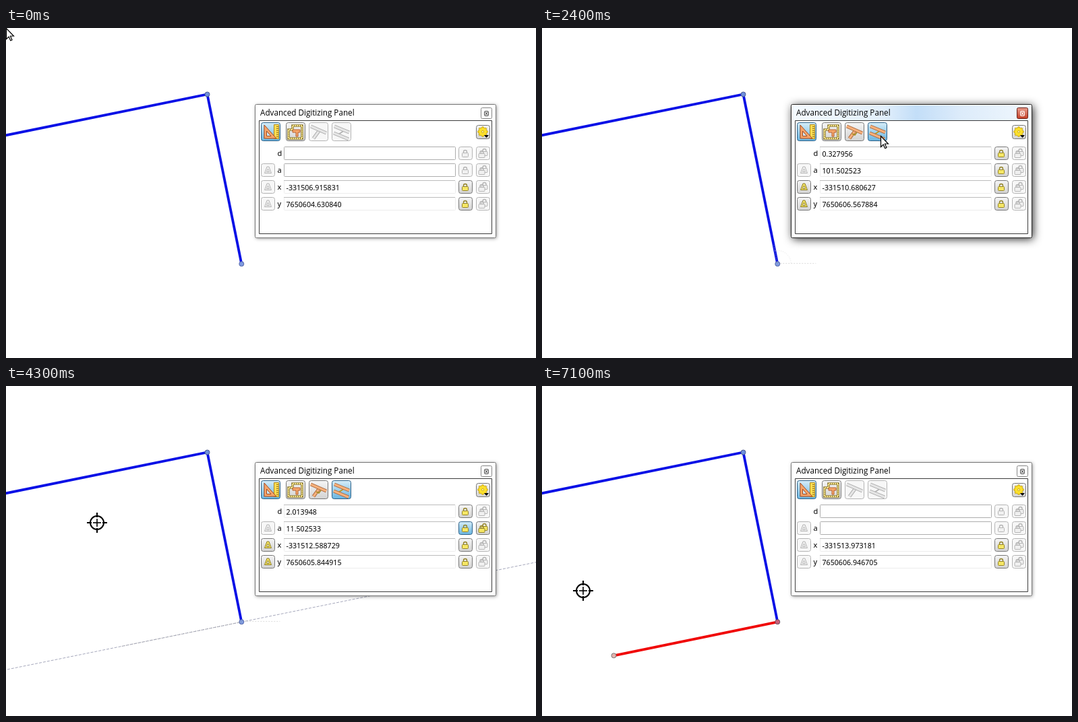
An HTML page with a canvas that plays this animation: 786x490 px, repeating every 7200 ms.

```html
<!DOCTYPE html>
<html lang="en">
<head>
<meta charset="utf-8">
<title>Advanced Digitizing Panel</title>
<style>
html, body { margin: 0; width: 100%; height: 100%; overflow: hidden; background: #fff; }
canvas { display: block; }
</style>
</head>
<body>
<canvas id="stage" width="786" height="490"></canvas>
<script>
const ctx = document.getElementById('stage').getContext('2d');
const LOOP = 7200, STEP = 100, UNIT = 0.011;
const BLUE = '#0810e6', RED = '#f00505';
const ORIGIN = { x: -331510.6152289, y: 7650606.2465147 };
const START = [0, 0], END = [-2.671, -0.55];
const CORNER = [298.5, 98.5];
const ARROW = 0, CROSS = 1;

// time, then map offset from the first digitized point
const pointKeys = [
  [0, 3.699398, -1.615675], [100, -0.752, 0.953], [600, -0.152, 0.314],
  [700, 0, 0], [1000, 0, 0], [1300, -0.065398, 0.321369], [2700, -0.065398, 0.321369],
  [2800, -0.339, 1.6658], [2900, -0.668, 1.7021], [3100, -1.2725762, 1.7867803],
  [3400, -1.4516, 1.9027], [3600, -1.8062, 2.2618], [3700, -1.97, 2.4818],
  [3900, -2.220264, 2.43097], [4100, -2.220264, 2.43097], [4200, -1.657, -0.3372],
  [4400, -2.29, -0.466], [4700, -2.27, -0.4619], [4900, -1.993668, -0.405709],
  [5300, ...END], [5500, ...END], [5800, -2.8537, 0.4519],
  [6000, -2.962828, 0.722141], [6500, -3.357952, 0.70019]
];
// time, stage position, pointer kind
const cursorKeys = [
  [0, 0, 0, ARROW], [100, 296, 281, CROSS], [600, 350, 339, CROSS], [800, 366, 369, CROSS],
  [1000, 366, 369, CROSS], [1300, 362, 338, CROSS], [1400, 386, 290, ARROW],
  [1500, 409, 262, ARROW], [2200, 494, 157, ARROW], [2500, 506, 161, ARROW],
  [2600, 494, 165, ARROW], [2700, 428, 174, ARROW], [2800, 337, 202, CROSS],
  [3100, 248, 205, CROSS], [3400, 233, 195, CROSS], [3900, 165, 148, CROSS],
  [4100, 165, 148, CROSS], [4400, 120, 230, CROSS], [4700, 135, 300, CROSS],
  [4900, 159, 307, CROSS], [5300, 118, 402, CROSS], [5500, 118, 402, CROSS],
  [5700, 108, 346, CROSS], [5800, 90, 309, ARROW], [6000, 80, 285, ARROW],
  [6100, 94, 302, CROSS], [6500, 61, 304, CROSS]
];

const within = (t, a, b) => t >= a && t < b;
const toStage = ([x, y]) => [349.3 + x / UNIT, 350.3 - y / UNIT];

function sample(keys, t) {
  let i = keys.length - 1;
  while (keys[i][0] > t) i--;
  const a = keys[i], b = keys[i + 1] || a;
  const k = b === a ? 0 : (t - a[0]) / (b[0] - a[0]);
  return [a[1] + (b[1] - a[1]) * k, a[2] + (b[2] - a[2]) * k, a[3]];
}

function line(points, color, width = 1, dash = [], closed = false) {
  ctx.beginPath();
  points.forEach(p => ctx.lineTo(p[0], p[1]));
  if (closed) ctx.closePath();
  ctx.strokeStyle = color;
  ctx.lineWidth = width;
  ctx.setLineDash(dash);
  ctx.stroke();
  ctx.setLineDash([]);
}

function poly(points, fill, stroke, width = 1) {
  ctx.beginPath();
  points.forEach(p => ctx.lineTo(p[0], p[1]));
  ctx.closePath();
  if (fill) { ctx.fillStyle = fill; ctx.fill(); }
  if (stroke) { ctx.strokeStyle = stroke; ctx.lineWidth = width; ctx.stroke(); }
}

function box(x, y, w, h, fill, stroke, r = 0) {
  ctx.beginPath();
  ctx.roundRect(x + 0.5, y + 0.5, w - 1, h - 1, r);
  if (fill) { ctx.fillStyle = fill; ctx.fill(); }
  if (stroke) { ctx.strokeStyle = stroke; ctx.lineWidth = 1; ctx.stroke(); }
}

function ring(x, y, r, fill, stroke, width = 1) {
  ctx.beginPath();
  ctx.arc(x, y, r, 0, Math.PI * 2);
  if (fill) { ctx.fillStyle = fill; ctx.fill(); }
  if (stroke) { ctx.strokeStyle = stroke; ctx.lineWidth = width; ctx.stroke(); }
}

function text(str, x, y, font) {
  ctx.font = font;
  ctx.fillStyle = '#000';
  ctx.fillText(str, x, y);
}

function fade(y, h, top, bottom) {
  const g = ctx.createLinearGradient(0, y, 0, y + h);
  g.addColorStop(0, top);
  g.addColorStop(1, bottom);
  return g;
}

function button(x, y, w, h, state) {
  if (state === 'down') {
    box(x, y, w, h, fade(y, h, '#d8eef9', '#67b4e0'), '#2c5f86', 3);
  } else if (state === 'on') {
    box(x, y, w, h, fade(y, h, '#f6f6f6', '#d2d2d2'), '#777', 3);
  } else {
    box(x, y, w, h, '#f7f7f7', '#b4b4b4', 3);
  }
}

function bar(a, b, on) {
  line([a, b], on ? '#a8643a' : '#a9a9a9', 5);
  line([a, b], on ? '#f6b17c' : '#e6e6e6', 3);
}

function padlock(x, y, on) {
  const edge = on ? '#94842a' : '#b5b5b5';
  ctx.beginPath();
  ctx.arc(x, y - 2, 2.5, Math.PI, 0);
  ctx.lineTo(x + 2.5, y);
  ctx.moveTo(x - 2.5, y - 2);
  ctx.lineTo(x - 2.5, y);
  ctx.strokeStyle = edge;
  ctx.lineWidth = 1.4;
  ctx.stroke();
  box(x - 5, y - 1, 10, 7, on ? '#f6e766' : '#f0f0f0', edge, 1);
}

function delta(x, y, on) {
  const edge = on ? '#8d7c22' : '#b5b5b5';
  poly([[x - 1.5, y - 5], [x + 1.5, y - 5], [x + 5, y + 4.5], [x - 5, y + 4.5]],
    on ? '#f6e766' : '#f2f2f2', edge);
  poly([[x, y - 2], [x + 2, y + 2.5], [x - 2, y + 2.5]], '#fff', edge);
}

function toolbar(s) {
  button(378, 140, 29, 28, 'down');
  box(397, 143, 8, 22, '#f9dc52', '#b08a20');
  for (let y = 146; y < 164; y += 3) line([[401, y + 0.5], [404, y + 0.5]], '#94701a');
  poly([[383, 144], [383, 164], [401, 164]], '#f5a56a', '#a5481c');
  poly([[386.5, 153], [386.5, 160.5], [393, 160.5]], '#cde6f2', '#a5481c');

  button(415, 140, 29, 28, 'on');
  const shape = [[419, 151], [425, 151], [425, 145], [439, 145], [439, 164], [419, 164]];
  line(shape, '#8d7b35', 3.5, [], true);
  line(shape, '#f7e48b', 2, [2, 1], true);
  poly([[425, 151], [436, 151], [436, 155], [433, 155], [433, 161], [430, 161], [430, 155], [425, 155]],
    '#f5a56a', '#b8602f');

  button(449, 140, 29, 28, s.live ? 'on' : 'off');
  bar([464, 153], [456, 164], s.live);
  bar([452, 146], [475, 156], s.live);
  if (s.live) line([[460, 157], [464, 159], [467, 155]], '#a58d1e', 1.5);

  button(483, 140, 29, 28, s.parallel ? 'down' : s.live ? 'on' : 'off');
  line([[502, 152], [493, 158]], s.live ? '#b99a25' : '#b5b5b5', 2);
  bar([487, 146], [509, 155], s.live);
  bar([486, 156], [508, 165], s.live);

  button(697, 144, 21, 21, 'on');
  for (let i = 0; i < 8; i++) {
    const a = i * Math.PI / 4;
    ring(707 + 5.5 * Math.cos(a), 154 + 5.5 * Math.sin(a), 1.9, '#f6d51c', '#b89516', 0.7);
  }
  ring(707, 154, 5.5, '#fbe02c');
  ring(707, 154, 1.6, '#fff3a0', '#c7a516', 0.8);
  poly([[709, 159], [716, 159], [712.5, 163]], '#000');
}

function row(i, name, value, s) {
  const y = 176 + i * 25, coord = i > 1, on = s.live || coord;
  if (i) {
    const active = s.live && coord;
    button(378, y, 21, 20, active ? 'on' : 'off');
    delta(388.5, y + 10, active);
  }
  text(name, 402.5, y + 14, '11px "Noto Sans", "Open Sans", sans-serif');
  if (on) {
    box(412, y, 255, 20, '#fff', '#ececec', 1);
    line([[412, y + 0.5], [666, y + 0.5]], '#bcbcbc');
    text(value, 415.5, y + 15, '10.65px "Noto Sans", "Open Sans", sans-serif');
  } else {
    box(412, y, 255, 20, '#fff', '#adadad', 1);
  }
  const locked = s.locked && i === 1;
  button(671, y, 21, 20, locked ? 'down' : on ? 'on' : 'off');
  padlock(681, y + 10, on);
  button(697, y, 21, 20, locked ? 'on' : 'off');
  padlock(709.5, y + 8, locked);
  padlock(705.5, y + 11, locked);
}

function panel(s) {
  ctx.save();
  ctx.shadowColor = s.active ? 'rgba(0,0,0,.85)' : 'rgba(0,0,0,.45)';
  ctx.shadowBlur = s.active ? 13 : 5;
  ctx.shadowOffsetX = ctx.shadowOffsetY = s.active ? 2 : 1;
  box(369, 113, 358, 199, '#fff', null, 2);
  ctx.restore();
  box(369, 113, 358, 199, '#fff', s.active ? '#222' : '#777', 2);
  if (s.active) {
    const g = ctx.createLinearGradient(371, 0, 725, 0);
    g.addColorStop(0, '#f4fafe');
    g.addColorStop(0.38, '#e2effb');
    g.addColorStop(0.52, '#c3def8');
    g.addColorStop(0.7, '#dcebfa');
    g.addColorStop(1, '#f0f7fd');
    ctx.fillStyle = g;
    ctx.fillRect(371, 115, 354, 22);
  }
  text('Advanced Digitizing Panel', 377, 130, '11.7px "Open Sans", "Noto Sans", sans-serif');
  box(704, 118, 17, 17, s.active ? fade(118, 17, '#e8a090', '#c33d24') : '#fff',
    s.active ? '#6b2018' : '#858585', 2);
  const mark = s.active ? '#fff' : '#555';
  box(709, 123, 7, 8, null, mark, 1);
  line([[710.5, 124.5], [714.5, 129.5]], mark, 1.2);
  line([[714.5, 124.5], [710.5, 129.5]], mark, 1.2);

  box(375, 137, 346, 169, '#fff', '#3c3c3c');
  toolbar(s);
  const dx = s.point[0] - s.base[0], dy = s.point[1] - s.base[1];
  const angle = s.angle || Math.atan2(dy, dx) * 180 / Math.PI;
  row(0, 'd', Math.hypot(dx, dy).toFixed(6), s);
  row(1, 'a', angle.toFixed(6), s);
  row(2, 'x', (ORIGIN.x + s.point[0]).toFixed(6), s);
  row(3, 'y', (ORIGIN.y + s.point[1]).toFixed(6), s);
}

function map(s) {
  const start = toStage(START), end = toStage(END), at = toStage(s.point), base = toStage(s.base);
  const west = [-10, 161.3];

  if (s.guideUp) line([[278.6, 0], [377.3, 489]], '#a6a8bc', 1, [4, 2]);
  if (s.guideAcross) line([[2, 420.9], [786, 261.7]], '#a6a8bc', 1, [4, 2]);

  line([west, CORNER, start], BLUE, 3.8);
  if (s.drawn) line([start, end], RED, 3.8);
  ring(...CORNER, 3.5, '#6f8fdc', '#4a5a90');
  ring(...start, 3.5, s.drawn ? '#c9607a' : '#7f9be0', s.drawn ? '#6d5060' : '#5566a8');
  if (s.drawn) ring(...end, 3.5, '#e3b3ae', '#777');

  const glow = 'rgba(255,176,84,.52)';
  if (s.snapUp) line([CORNER, start], glow, 6);
  if (s.snapAcross) line([west, CORNER], glow, 6);
  if (s.snapUp) ring(...start, 3.5, '#c3a59a', '#8f7a72');
  if (s.snapUp || s.snapAcross) ring(...CORNER, 3.5, '#b09a98', '#80706e');

  if (s.live) {
    line([base, at], '#9a9a9a', 1, [1, 2]);
    line([[base[0] + 4, base[1] - 0.8], [base[0] + 57, base[1] - 0.8]], '#dcdcdc', 1, [2, 2]);
    ctx.beginPath();
    ctx.arc(base[0], base[1], 20, -Math.atan2(s.point[1] - s.base[1], s.point[0] - s.base[0]), 0);
    ctx.strokeStyle = '#e2e2e2';
    ctx.lineWidth = 1;
    ctx.setLineDash([1, 2]);
    if (s.point[1] > s.base[1]) ctx.stroke();
    ctx.setLineDash([]);
  }
  if (s.snapUp || s.snapAcross) {
    const x = Math.round(at[0]), y = Math.round(at[1]);
    line([[x - 6, y], [x + 6, y]], '#ff00ff', 3);
    line([[x, y - 6], [x, y + 6]], '#ff00ff', 3);
  }
}

function cursor([px, py, kind]) {
  const x = Math.round(px), y = Math.round(py);
  ctx.save();
  ctx.translate(x, y);
  if (kind === ARROW) {
    poly([[0.5, 0.5], [0.5, 16.5], [4.2, 13], [6.8, 18.8], [9, 17.8], [6.5, 12], [11.5, 12]],
      '#fff', '#000', 1.2);
  } else {
    ring(0, 0, 10, null, '#fff', 5);
    ring(0, 0, 10, null, '#000', 2);
    for (let i = 0; i < 4; i++) {
      line([[8, 0], [15, 0]], '#000', 2);
      line([[0, 0], [6, 0]], '#000', 1.6);
      ctx.rotate(Math.PI / 2);
    }
  }
  ctx.restore();
}

function stateAt(t) {
  const s = {
    point: sample(pointKeys, t),
    base: t < 5400 ? START : END,
    live: within(t, 1000, 5800),
    active: within(t, 2300, 4100),
    parallel: within(t, 2300, 5400),
    locked: within(t, 4200, 5400),
    snapUp: within(t, 700, 2300) || within(t, 2800, 2900),
    snapAcross: within(t, 3700, 4200),
    guideUp: within(t, 2800, 2900),
    guideAcross: within(t, 3700, 5400),
    drawn: t >= 5400
  };
  s.angle = s.guideAcross ? 11.502533 : s.snapUp ? 101.502533 : 0;
  return s;
}

function frame() {
  const t = Math.floor(performance.now() % LOOP / STEP) * STEP;
  const s = stateAt(t);
  ctx.fillStyle = '#fff';
  ctx.fillRect(0, 0, 786, 490);
  map(s);
  panel(s);
  cursor(sample(cursorKeys, t));
  requestAnimationFrame(frame);
}
frame();
</script>
</body>
</html>
```
